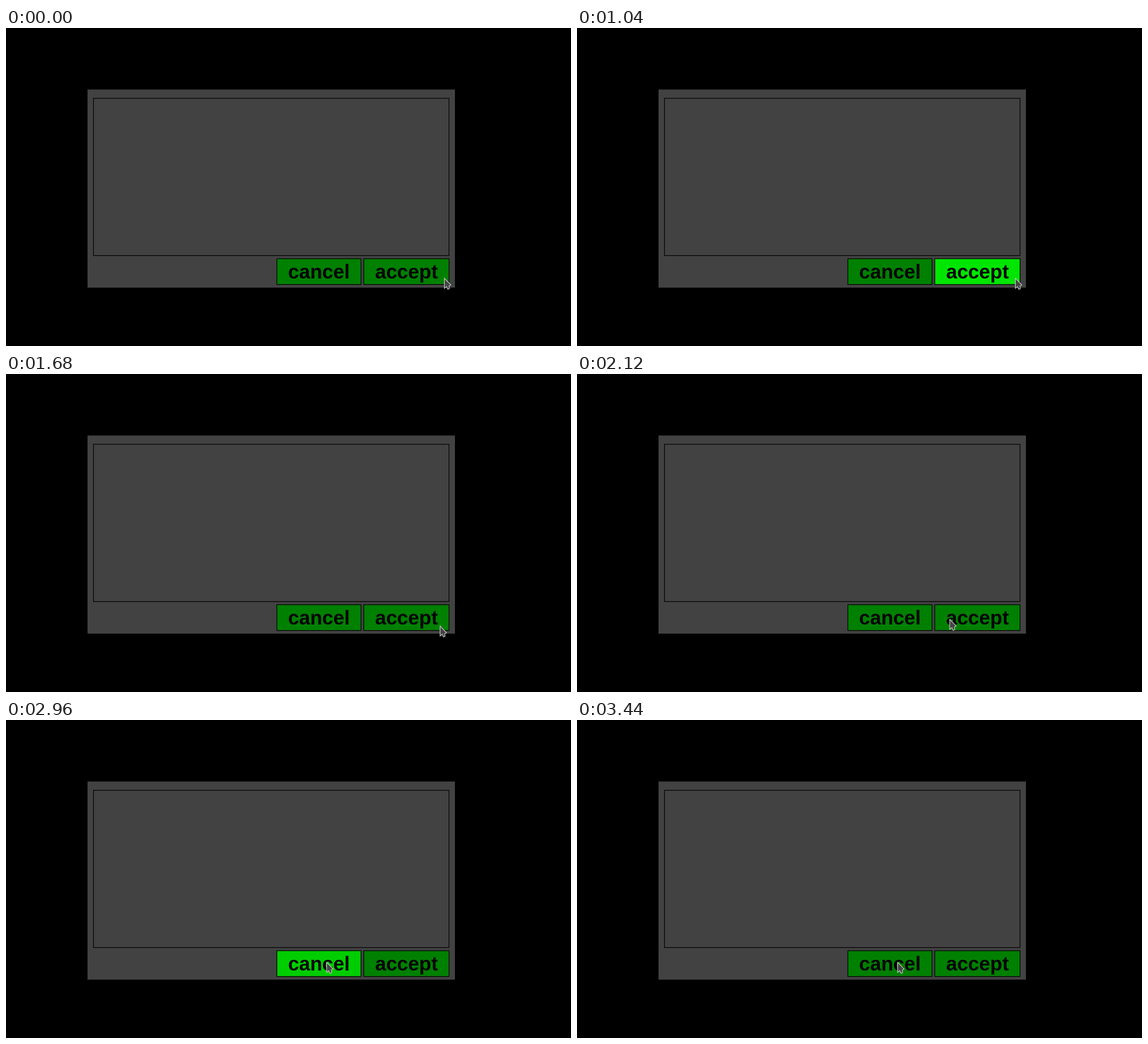
An HTML page for the animation above (4000 ms loop, 998 px wide and 561 px high).

```html
<!DOCTYPE html>
<html lang="en">
<head>
<meta charset="utf-8">
<title>Dialog buttons</title>
<style>
  html, body { margin: 0; width: 100%; height: 100%; overflow: hidden; background: #000; }
  svg { display: block; }
  .line { stroke: #000; stroke-width: 1.2; }
  text { font: bold 35px "Liberation Sans", Arial, sans-serif; text-anchor: middle; }
</style>
</head>
<body>
<svg width="998" height="561" viewBox="0 0 998 561">
  <rect x="144" y="108.5" width="649" height="349.5" fill="#424242"/>
  <rect class="line" x="154.5" y="124" width="628" height="277.5" fill="none"/>
  <rect class="line" id="cancel" x="478.5" y="407" width="148.5" height="45.5"/>
  <rect class="line" id="accept" x="632" y="407" width="150.5" height="45.5"/>
  <text x="552.7" y="442">cancel</text>
  <text x="707.4" y="442">accept</text>
  <path id="cursor" d="M.4 .5V18.2L4.2 15.2L6.3 20L9.2 18.8L8.6 14L11.8 12.4Z"
        fill="#444" stroke="#c4c4c4" stroke-width="1.2"/>
</svg>
<script>
  const LOOP = 4000, STEP = 40;
  const [cancel, accept, cursor] = ["cancel", "accept", "cursor"].map(id => document.getElementById(id));
  const clamp = v => Math.min(1, Math.max(0, v));
  const ease = s => s * s * (3 - 2 * s);

  // Brightens and dims again, 280 ms each way around the peak.
  function flash(button, time, peak) {
    const glow = ease(clamp(1 - Math.abs(time - peak) / 280));
    button.setAttribute("fill", `rgb(0,${Math.round(128 + 127 * glow)},0)`);
  }

  function draw(now) {
    const time = Math.floor(now % LOOP / STEP) * STEP;
    flash(accept, time, 960);
    flash(cancel, time, 3080);

    // The pointer dips at the start and overshoots upward before it settles.
    const s = clamp((time - 1560) / 1040);
    const x = 774 - 208 * ease(s);
    const y = 441 - 14 * ease(s) + 46 * s * (1 - s) * (1 - 2 * s);
    cursor.setAttribute("transform", `translate(${x} ${y})`);
  }

  const start = performance.now();
  function tick() {
    draw(performance.now() - start);
    requestAnimationFrame(tick);
  }
  tick();
</script>
</body>
</html>
```
